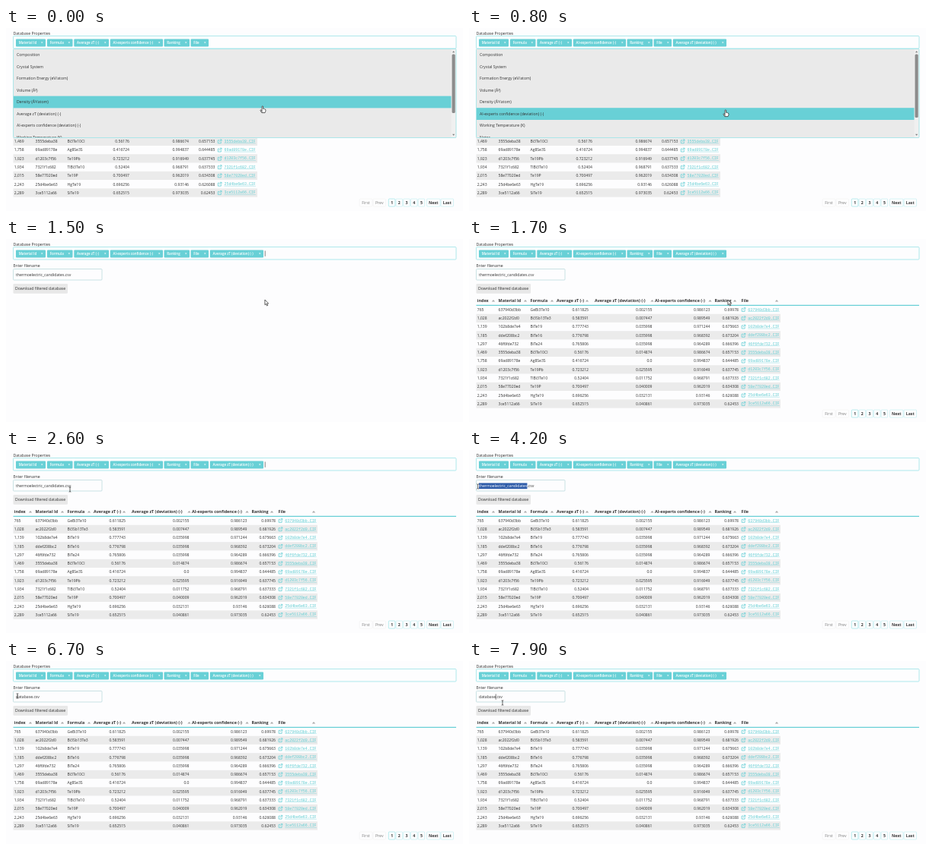
Write an HTML page that moves like this. It is 600 by 241 pixels and loops after 8000 ms.

```html
<!DOCTYPE html>
<html lang="en">
<head>
<meta charset="utf-8">
<title>Database export</title>
<style>
  html, body { margin: 0; width: 100%; height: 100%; overflow: hidden; background: #fdfdfe; }
  svg { display: block; width: 600px; height: 241px; }
  text { font: 5.15px "Open Sans", "Noto Sans", sans-serif; fill: #333; white-space: pre; }
  .cell { font-size: 5.05px; }
  .head { font-size: 5.45px; font-weight: 700; }
  .chip { font-size: 4.5px; font-weight: 600; fill: #fff; }
  .bold { font-weight: 700; }
  .dim { fill: #7d7d7d; }
  .link { font: 4.93px "Liberation Mono", monospace; fill: #5fcdd2; }
  .light { fill: #fff; }
  .end { text-anchor: end; }
  .mid { text-anchor: middle; }
</style>
</head>
<body>
<svg id="stage" viewBox="0 0 600 241"></svg>
<script>
const LOOP = 8000, TEAL = '#68d0d6', EDGE = '#9be4e7';
const PICK = 500, CLOSE = 1100, TABLE = 1700, PRESS = 3000, TYPE = 4500;

const text = (x, y, s, cls = '') => `<text x="${x}" y="${y}" class="${cls}">${s}</text>`;
const box = (x0, y0, x1, y1, fill, extra = '') =>
  `<rect x="${x0}" y="${y0}" width="${x1 - x0}" height="${y1 - y0}" fill="${fill}" ${extra}/>`;
const line = (d, color, w) => `<path d="${d}" fill="none" stroke="${color}" stroke-width="${w}"/>`;
const group = (id, body) => `<g id="${id}">${body}</g>`;
const border = (color, w) => `stroke="${color}" stroke-width="${w}" rx="1"`;

const rows = `765 637940d3bb GeBi3Te10 0.611825 0.002155 0.986123 0.69978
1,028 ac2022f2d0 Bi3Sb13Te3 0.583591 0.007447 0.989549 0.681926
1,139 102b8de7e4 BiTe19 0.777743 0.035998 0.971244 0.675663
1,185 ddef208bc2 BiTe16 0.776798 0.035998 0.968392 0.673204
1,297 46f6fde732 BiTe24 0.765806 0.035998 0.964289 0.666396
1,469 3555deba38 Bi3Te10Cl 0.56176 0.014874 0.986674 0.657153
1,758 69ad89178e Ag8Se3S 0.416724 0.0 0.994837 0.644485
1,923 d1203c7f56 Te19Pb 0.723212 0.025595 0.916949 0.637745
1,934 7321f1c682 TlBi3Te10 0.52404 0.011752 0.968791 0.637333
2,015 58e77020ed Te19P 0.700497 0.040009 0.962019 0.634308
2,243 25d4be6e63 HgTe19 0.696256 0.032131 0.93146 0.626088
2,289 3ce5112a66 SiTe19 0.652515 0.040861 0.973035 0.62453`
  .split('\n').map(r => r.split(' '));

function chip(x0, x1, label) {
  return box(x0, 14.5, x1, 24.5, TEAL, 'rx="1"') + text(x0 + 3.7, 21.2, label, 'chip') +
    text(x1 - 4.6, 21.2, '×', 'chip mid');
}

// Right edges of the four number columns (null hides one), then the file column.
function tableRows(edges, fileX, right) {
  return rows.map((r, i) => {
    const mid = 93 + i * 11.27, y = mid + 1.8;
    let s = i % 2 ? box(9.5, mid - 5.6, right, mid + 5.6, '#ebebeb') : '';
    s += [10.8, 38.5, 80.5].map((x, k) => text(x, y, r[k], 'cell')).join('');
    s += edges.map((x, k) => x ? text(x, y, r[k + 3], 'cell end') : '').join('');
    s += line(`M${fileX + 2.6} ${mid - 1.6}h-2.3v4h4v-2.3M${fileX + 2} ${mid + .6}l3-3m-2 0h2v2`, TEAL, .8);
    s += text(fileX + 8.5, y - .3, r[1] + '.CIF', 'link');
    return s + line(`M${fileX + 8.5} ${y + .7}h41.4`, TEAL, .4);
  }).join('');
}

function header() {
  const names = [[10.8, 'index', 32], [38.5, 'Material Id', 74], [80.5, 'Formula', 109],
    [115, 'Average zT (-)', 155], [165, 'Average zT (deviation) (-)', 240.5],
    [244, 'AI-experts confidence (-)', 316.5], [322.5, 'Ranking', 349], [357.5, 'File', 404]];
  return names.map(([x, s, a]) => text(x, 83.4, s, 'head') +
    `<path d="M${a - 2.2} 82.4l2.2-2.4 2.2 2.4z" fill="#aaa"/>`).join('') +
    line('M9.5 87.4H591', TEAL, 1.1);
}

function pager() {
  const button = (x0, x1, label, cls, color, w) =>
    box(x0, 225, x1, 235, '#fdfdfe', border(color, w)) + text((x0 + x1) / 2, 231.8, label, cls + ' mid');
  let s = button(464, 481, 'First', 'dim', '#eee', .5) + button(482, 498.5, 'Prev', 'dim', '#eee', .5);
  for (let n = 1; n < 6; n++) s += button(492.6 + n * 9.7, 501.2 + n * 9.7, n, 'bold', EDGE, n == 1 ? .7 : .4);
  return s + button(552.5, 570, 'Next', 'bold', EDGE, .4) + button(571, 587.5, 'Last', 'bold', EDGE, .4);
}

const options = ['Composition', 'Crystal System', 'Formation Energy (eV/atom)', 'Volume (Å³)',
  'Density (Å³/atom)', 'Average zT (deviation) (-)', 'AI-experts confidence (deviation) (-)',
  'Working Temperature (K)', 'Notes'];

function list(items, thumbEnd) {
  return items.slice(0, 8).map((s, i) => text(14, 37 + i * 15.55, s)).join('') +
    box(584.7, 28, 590.5, 144, '#f0f0f0') + box(585.5, 34.5, 589.7, thumbEnd, '#8c8c8c', 'rx="1.5"') +
    '<path d="M586 32.2l1.6-2 1.6 2zM586 139.8l1.6 2 1.6-2z" fill="#777"/>';
}

const menu = group('menu', box(9.5, 27.5, 591, 144.5, '#eaeaea') +
  '<g clip-path="url(#menuClip)">' + box(9.5, 89.6, 584.7, 105.4, TEAL, 'id="hover"') +
  group('listBefore', list(options, 112)) +
  group('listAfter', list(options.filter((_, i) => i != 5), 118)) + '</g>' +
  box(9.5, 27.5, 591, 144.5, 'none', border(EDGE, .8)));

const pointers =
  group('hand', `<path d="M-1 4V-3.2Q-1-4.2-.2-4.2T.6-3.2V-.6Q1.4-1.1 1.9-.3Q2.7-.6 3 .2Q3.9 0 3.9 1V2.4L3 4.6H-1.2L-3.2 1.4Q-2.6.2-1 1.8" fill="#fff" stroke="#222" stroke-width=".7"/>`) +
  group('arrow', `<path d="M-1.6-4V2.7L-.1 1.4 1 4 2.2 3.4 1.1 1H3.1Z" fill="#fff" stroke="#222" stroke-width=".7"/>`) +
  group('beam', line('M-1.3-3.2Q0-3.2 0-2.4V2.4Q0 3.2 1.3 3.2M1.3-3.2Q0-3.2 0-2.4M0 2.4Q0 3.2-1.3 3.2', '#222', .7));

const stage = document.getElementById('stage');
stage.innerHTML =
  `<defs><clipPath id="menuClip">${box(9.5, 27.5, 591, 144.3, '#000')}</clipPath>
   <clipPath id="selClip">${box(0, 42, 0, 52, '#000', 'id="selArea"')}</clipPath></defs>` +
  box(0, 0, 600, 241, '#fdfdfe') + text(9.5, 8.6, 'Database Properties') +
  box(9.5, 10.5, 591, 27, '#fdfdfe', border(EDGE, .8)) +
  chip(13, 52, 'Material Id') + chip(54, 87.5, 'Formula') + chip(89.3, 135, 'Average zT (-)') +
  chip(136.8, 206, 'AI-experts confidence (-)') + chip(207.5, 241, 'Ranking') + chip(242.5, 266, 'File') +
  group('newChip', chip(267.8, 338, 'Average zT (deviation) (-)')) +
  group('searchCaret', line('M340.2 15.5V22.8', '#333', .6)) +
  group('form', text(9.5, 36.8, 'Enter filename') +
    box(9.5, 39.5, 126, 54, '#fdfdfe', border('#b3d6d9', .7)) +
    '<text id="file" x="13" y="49"></text>' + box(13, 43.5, 13, 51.2, '#2c5aa8', 'id="sel"') +
    `<g clip-path="url(#selClip)">${text(13, 49, 'thermoelectric_candidates.csv', 'light')}</g>` +
    group('fileCaret', line('M0 43.5V50.8', '#222', .6)) +
    box(9.5, 59, 81, 71.7, '#e8e8e8', 'rx="1.2"') + text(12, 67.2, 'Download filtered database')) +
  group('oldTable', tableRows([162, null, 240, 274.5], 278, 330)) +
  group('newTable', header() + tableRows([157, 240.5, 316.5, 354], 357.8, 409)) +
  group('pager', pager()) + menu + group('pointer', pointers);

const $ = id => document.getElementById(id);
const show = (id, on) => $(id).style.display = on ? '' : 'none';
const blink = t => (t % 1000 + 1000) % 1000 < 500;

const path = [[0, 337, 107], [300, 337, 112], [1100, 337, 112], [1400, 341.5, 84], [1900, 341.5, 84],
  [2600, 84, 52], [2750, 84, 52], [PRESS, 76.5, 48], [3900, 11.6, 48], [4250, 11.6, 48],
  [4500, 15, 46], [7300, 15, 46], [7900, 44, 55], [LOOP, 44, 55]];

function pointerAt(t) {
  const i = path.findIndex(p => p[0] > t), [t0, x0, y0] = path[i - 1], [t1, x1, y1] = path[i];
  const u = (t - t0) / (t1 - t0), k = u * u * (3 - 2 * u);
  return [x0 + (x1 - x0) * k, y0 + (y1 - y0) * k];
}

const oldName = 'thermoelectric_candidates', newName = 'database', keyTime = 190;

function drawField(t, px) {
  const typed = t < TYPE ? 0 : Math.min(newName.length, 1 + Math.floor((t - TYPE) / keyTime));
  const name = typed ? newName.slice(0, typed) : oldName;
  const file = $('file');
  if (file.textContent != name + '.csv') file.textContent = name + '.csv';
  const width = n => n ? file.getSubStringLength(0, n) : 0;
  let from = 0, to = 0;
  if (t >= PRESS && t < TYPE) {
    to = width(oldName.length);
    let n = oldName.length;
    while (n && 13 + width(n) > px + 1) n--;
    from = width(n);
  }
  for (const id of ['sel', 'selArea']) {
    $(id).setAttribute('x', 13 + from);
    $(id).setAttribute('width', to - from);
  }
  const last = TYPE + keyTime * (newName.length - 1);
  show('fileCaret', typed && (t < last || blink(t - last)));
  $('fileCaret').setAttribute('transform', `translate(${13.2 + width(typed)})`);
}

function draw() {
  const t = performance.now() % LOOP, [x, y] = pointerAt(t), open = t < CLOSE;
  show('menu', open);
  show('oldTable', open);
  show('form', !open);
  show('newTable', t >= TABLE);
  show('pager', open || t >= TABLE);
  show('newChip', t >= PICK);
  show('listBefore', t < PICK);
  show('listAfter', t >= PICK);
  $('hover').setAttribute('y', t < 150 ? 89.6 : 105.2);
  show('searchCaret', !open && t < PRESS && blink(t - 1200));
  drawField(t, x);
  show('hand', open);
  show('arrow', !open && (x > 126 || y > 58));
  show('beam', !open && x <= 126 && y <= 58);
  $('pointer').setAttribute('transform', `translate(${x} ${y})`);
  requestAnimationFrame(draw);
}
draw();
</script>
</body>
</html>
```
